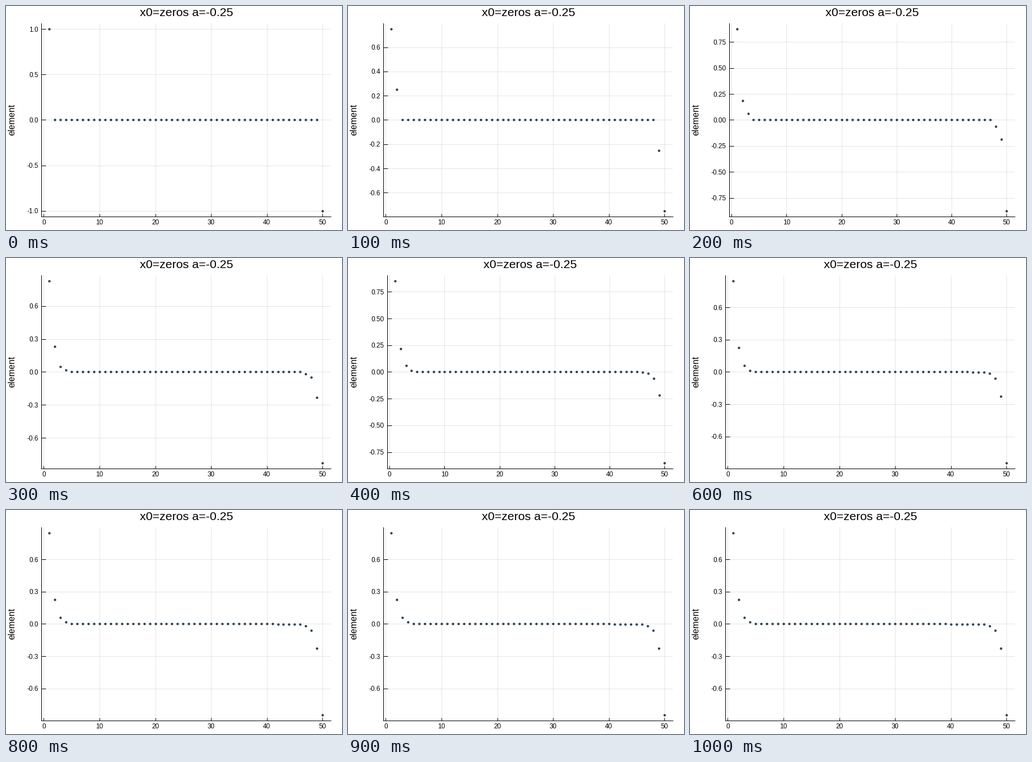
These frames come from a looping animation (600x400 px, 2500 ms). A matplotlib script:

```python
import numpy as np
import matplotlib.pyplot as plt
from matplotlib.animation import FuncAnimation
from matplotlib.ticker import FixedLocator, FormatStrFormatter

W, H, DPI = 600, 400, 100
PX = 72 / DPI                      # points per pixel
TOP, BOTTOM, RIGHT = 31.3, 375.7, 579.8
N, A, STEPS = 50, -0.25, 11
FRAMES, INTERVAL = 25, 100

plt.rcParams["font.family"] = "Liberation Sans"
plt.rcParams["axes.unicode_minus"] = False


def iterate():
    """Fixed-point sweeps of x = b - M x, starting from zeros."""
    m = A * (np.eye(N, k=1) + np.eye(N, k=-1))
    m[0, 0] = m[-1, -1] = -A
    b = np.zeros(N)
    b[0], b[-1] = 1, -1
    x, out = np.zeros(N), []
    for _ in range(STEPS):
        x = b - m @ x
        out.append(x)
    return out


states = iterate()
tick_steps = [0.5, 0.2, 0.25, 0.3, 0.25] + [0.3] * (STEPS - 5)

fig = plt.figure(figsize=(W / DPI, H / DPI), dpi=DPI, facecolor="white")
ax = fig.add_axes([0.1, 0.1, 0.8, 0.8])
ax.set_axisbelow(True)
ax.grid(True, color="black", alpha=0.1, lw=PX)
for side in ("top", "right"):
    ax.spines[side].set_visible(False)
for side in ("left", "bottom"):
    ax.spines[side].set_linewidth(PX)
ax.tick_params(direction="in", width=PX, labelsize=11.7 * PX)
ax.tick_params(axis="x", length=5.2 * PX, pad=5.4 * PX)
ax.tick_params(axis="y", length=7.5 * PX, pad=4.8 * PX)

margin = 0.03 * (N - 1)
ax.set_xlim(1 - margin, N + margin)
ax.xaxis.set_major_locator(FixedLocator(range(0, N + 1, 10)))
ax.set_title("x0=zeros a=-0.25", fontsize=21.4 * PX, x=0.5015, y=1, pad=13.3 * PX)
fig.text(15.2 / W, 1 - 202.5 / H, "element", fontsize=15.8 * PX, rotation=90,
         rotation_mode="anchor", ha="center", va="baseline")

dots, = ax.plot(np.arange(1, N + 1), states[0], "o", ms=3 * PX, mew=PX,
                mfc="#009afa", mec="black", clip_on=False, zorder=3)


def update(i):
    k = min(i, STEPS - 1)
    x, step = states[k], tick_steps[k]
    wide = step == 0.25
    left = 69.5 if wide else 62.8
    ax.set_position([left / W, 1 - BOTTOM / H,
                     (RIGHT - left) / W, (BOTTOM - TOP) / H])
    lim = 1.06 * x.max()
    ax.set_ylim(-lim, lim)
    n = int(lim / step)
    ax.yaxis.set_major_locator(FixedLocator(np.arange(-n, n + 1) * step))
    ax.yaxis.set_major_formatter(FormatStrFormatter("%.2f" if wide else "%.1f"))
    dots.set_ydata(x)
    return dots,


anim = FuncAnimation(fig, update, frames=FRAMES, interval=INTERVAL,
                     repeat=True, repeat_delay=0, blit=False)
plt.show()
```
